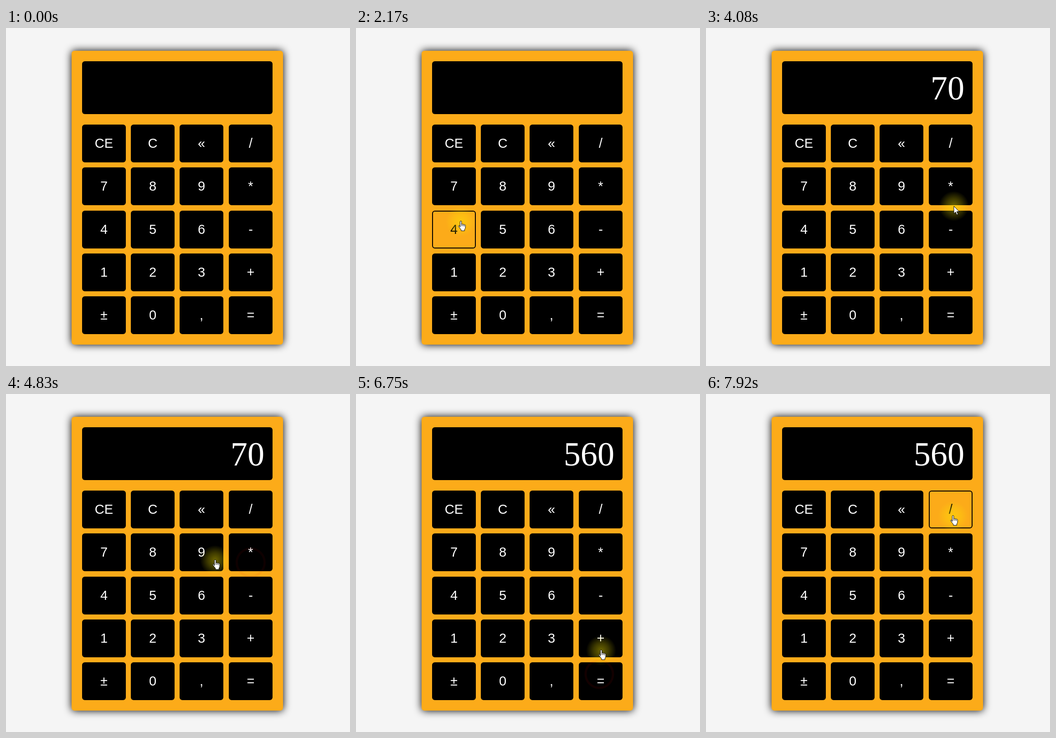
Animation of 755 by 742 pixels, one loop 8 s. Source, as an HTML page:

```html
<!DOCTYPE html>
<html lang="en">
<head>
<meta charset="utf-8">
<title>Calculator</title>
<style>
  html, body { margin: 0; width: 100%; height: 100%; overflow: hidden; background: #f5f5f5; }
  #panel, #display, .key, svg { position: absolute; box-sizing: border-box; }
  #panel { left: 144px; top: 50px; width: 464px; height: 645px; border-radius: 6px;
    background: #fcab19; box-shadow: 0 0 18px #000; }
  #display { left: 167px; top: 73px; width: 418px; height: 116px; padding-right: 18px;
    border-radius: 6px; background: #000; color: #fff; text-align: right;
    font: 74.24px/118px "Liberation Serif", serif; }
  .key { width: 96px; height: 83px; display: flex; align-items: center; justify-content: center;
    border: 2px solid #000; border-radius: 6px; background: #000; color: #fff;
    font: 29px "Liberation Sans", sans-serif; }
  .key.hover { background: #fcab19; color: #000; }
  svg { left: 0; top: 0; }
</style>
</head>
<body>
<div id="panel"></div>
<div id="display"></div>
<svg width="755" height="742" viewBox="0 0 755 742">
  <defs>
    <radialGradient id="shine">
      <stop offset="0" stop-color="#fe0" stop-opacity=".43"/>
      <stop offset=".5" stop-color="#fe0" stop-opacity=".24"/>
      <stop offset="1" stop-color="#fe0" stop-opacity="0"/>
    </radialGradient>
  </defs>
  <circle id="ring" fill="none" stroke="#f00" stroke-width="5"/>
  <g id="pointer">
    <circle r="33" fill="url(#shine)"/>
    <g fill="#fff" stroke="#000" stroke-linejoin="round">
      <path id="arrow" d="M0 0V16.5l3.8-3.6 2.7 6.3 2.6-1.1-2.7-6.1H11.6z"/>
      <g id="hand" transform="translate(-6 -2)">
        <path d="M4.5 14V2.3a1.6 1.6 0 0 1 3.2 0V8c.3-1 2.9-.9 3 .5 .4-.9 2.7-.7 2.8.7 .5-.7 2.6-.5 2.6 1.2v4.6c0 2-1.6 3.4-1.8 5v2.2H6.8v-2c-.8-1.9-3.6-4.3-5.6-7.6-.9-1.7 1-2.6 2-1.5z"/>
        <path fill="none" d="M7.7 8v4M10.7 9v3M13.5 10v2.5"/>
      </g>
    </g>
  </g>
</svg>
<script>
const LOOP = 8000, STEPS_PER_MS = 12 / 1000;
const RING_LIFE = 6.35, RING_SIZE = 35;
const columns = [167, 274, 381, 489];
const rows = [212, 306, 401, 495, 589];
const labels = 'CE C « / 7 8 9 * 4 5 6 - 1 2 3 + ± 0 , ='.split(' ');

// Pointer waypoints: step, x, y
const path = [
  [6, 199, 384], [9, 285, 364], [12, 390, 358], [15, 490, 366], [16, 492, 388],
  [17, 477, 436], [19, 462, 530], [21, 385, 580], [23, 295, 535], [25, 243, 455],
  [27, 216, 395], [29, 213, 357], [33, 213, 357], [35, 276, 462], [36, 296, 518],
  [37, 313, 562], [38, 326, 597], [40, 338, 621], [43, 338, 621], [45, 400, 556],
  [47, 490, 450], [49, 544, 391], [51, 537, 370], [56, 537, 370], [59, 420, 362],
  [61, 331, 351], [64, 331, 351], [66, 352, 404], [67, 369, 418], [70, 450, 515],
  [73, 534, 615], [78, 534, 615], [81, 538, 563], [82, 538, 562], [84, 540, 600],
  [86, 540, 600], [90, 542, 440], [94, 542, 270], [95, 542, 268]
];
// Press: step, x, y
const clicks = [[32.3, 213, 357], [42, 338, 621], [52, 537, 370], [62.8, 331, 351], [75.1, 534, 615]];
const readings = [[0, ''], [33, '7'], [43, '70'], [64, '8'], [76, '560']];

const el = id => document.getElementById(id);
const display = el('display'), ring = el('ring'), pointer = el('pointer');
const arrow = el('arrow'), hand = el('hand');

const keys = labels.map((label, i) => {
  const key = document.createElement('div');
  const x = columns[i % 4], y = rows[i >> 2];
  key.className = 'key';
  key.textContent = label;
  key.style.left = x + 'px';
  key.style.top = y + 'px';
  document.body.insertBefore(key, document.querySelector('svg'));
  return { key, x, y };
});

function positionAt(step) {
  const i = path.findIndex(p => p[0] >= step);
  if (step < path[0][0]) return null;
  if (i === 0) return path[0].slice(1);
  const [s0, x0, y0] = path[i - 1], [s1, x1, y1] = path[i];
  const f = (step - s0) / (s1 - s0);
  return [x0 + (x1 - x0) * f, y0 + (y1 - y0) * f];
}

function keyAt(point) {
  return point && keys.find(({ x, y }) =>
    point[0] >= x && point[0] <= x + 96 && point[1] >= y && point[1] < y + 83);
}

function show(node, visible) {
  node.style.display = visible ? '' : 'none';
}

function drawRing(step) {
  const click = clicks.find(([at]) => step >= at && step < at + RING_LIFE);
  show(ring, click);
  if (!click) return;
  const age = (step - click[0]) / RING_LIFE;
  ring.setAttribute('cx', click[1]);
  ring.setAttribute('cy', click[2]);
  ring.setAttribute('r', Math.max(0, RING_SIZE * age - 2.5));
  ring.setAttribute('opacity', 1 - age);
}

function draw(step) {
  const point = positionAt(step);
  const current = keyAt(point);
  // A key lights up one step after the pointer enters it
  const lit = current === keyAt(positionAt(step - 1)) ? current : null;
  keys.forEach(k => k.key.classList.toggle('hover', k === lit));
  display.textContent = readings.filter(([at]) => at <= step).pop()[1];
  drawRing(step);
  show(pointer, point);
  if (!point) return;
  pointer.setAttribute('transform', `translate(${point.map(Math.round)})`);
  show(hand, current);
  show(arrow, !current);
}

const start = performance.now();
let shown = -1;
function tick() {
  const time = Math.max(0, performance.now() - start) % LOOP;
  const step = Math.min(95, Math.floor(time * STEPS_PER_MS + 0.12));
  if (step !== shown) draw(shown = step);
  requestAnimationFrame(tick);
}
tick();
</script>
</body>
</html>
```
